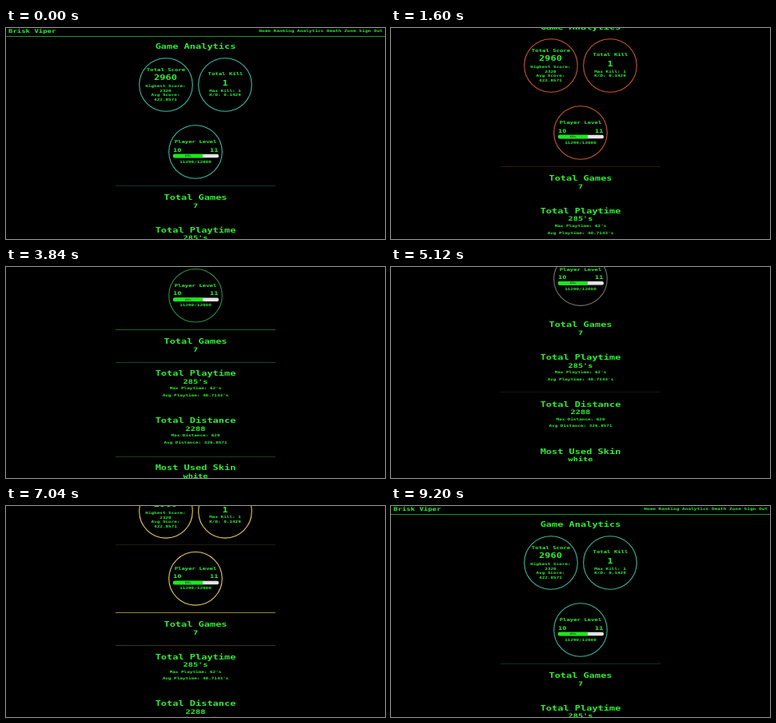
Animation of 474x264 px, one loop 9280 ms. Source, as an HTML page with a canvas:

```html
<!DOCTYPE html>
<html lang="en">
<head>
<meta charset="utf-8">
<title>Game Analytics</title>
<style>
  html, body { margin: 0; width: 100%; height: 100%; overflow: hidden; background: #000; }
  canvas { display: block; }
</style>
</head>
<body>
<canvas id="stage" width="474" height="264"></canvas>
<script>
const ctx = document.getElementById('stage').getContext('2d');
const W = 474, H = 264, MID = 237;
const LOOP = 9280, STEP = 80;
const GREEN = '#30f034';
const WIDEN = 1.38; // the typeface is wider than a regular monospace

// [time, value]
const SCROLL = [
  [0, 0], [1024, 0], [2480, 60.65], [3840, 119.25], [4440, 145],
  [4990, 145], [5840, 111.55], [7040, 64.15], [8650, 0], [LOOP, 0]
];
const BORDER = [
  [0, [62, 186, 164]], [1150, [180, 26, 24]], [2480, [232, 212, 92]],
  [3840, [46, 142, 74]], [4640, [62, 186, 164]]
];
const RULES = [112.4, 197.2, 238.35, 296.65, 356.38];

const lerp = (a, b, k) => Array.isArray(a) ? a.map((v, i) => lerp(v, b[i], k)) : a + (b - a) * k;

function at(keys, t) {
  const i = Math.max(1, keys.findIndex(key => key[0] >= t));
  const [t0, a] = keys[i - 1], [t1, b] = keys[i];
  return lerp(a, b, (t - t0) / (t1 - t0));
}

// advance = width of one character
function text(str, x, y, advance, align = 'center', color = GREEN) {
  const size = advance / 0.602 / WIDEN;
  ctx.save();
  ctx.translate(x, y + size * 0.365);
  ctx.scale(WIDEN, 1);
  ctx.font = `bold ${size}px "DejaVu Sans Mono", monospace`;
  ctx.textAlign = align;
  ctx.fillStyle = color;
  ctx.fillText(str, 0, 0);
  ctx.restore();
}

function ring(x, y, color) {
  ctx.beginPath();
  ctx.arc(x, y, 33.3, 0, Math.PI * 2);
  ctx.lineWidth = 1.1;
  ctx.strokeStyle = color;
  ctx.stroke();
}

// Hairlines fade in and out as they cross the pixel rows
function rule(y, color) {
  const distance = Math.abs(y - Math.round(y));
  ctx.globalAlpha = Math.max(0, 1 - distance / 0.3) * 0.8;
  ctx.fillStyle = color;
  ctx.fillRect(137, Math.floor(y + 0.15), 200, 1);
  ctx.globalAlpha = 1;
}

function bar(x, y, w, h, share) {
  ctx.save();
  ctx.beginPath();
  ctx.roundRect(x, y, w, h, h / 2);
  ctx.clip();
  ctx.fillStyle = '#e4e4e4';
  ctx.fillRect(x, y, w, h);
  ctx.fillStyle = '#10f010';
  ctx.fillRect(x, y, w * share, h);
  ctx.restore();
  text('65%', x + w * share / 2, y + h / 2, 2.6, 'center', '#0a4a0a');
}

function section(y, title, value, ...details) {
  text(title, MID, y, 7.2);
  text(value, MID, y + 10.2, 6.2);
  details.forEach((line, i) => text(line, MID, y + 18.6 + i * 8.9, 3.6));
}

function draw(t) {
  const scroll = at(SCROLL, t);
  const color = `rgb(${at(BORDER, t % (LOOP / 2)).map(Math.round)})`;
  ctx.fillStyle = '#000';
  ctx.fillRect(0, 0, W, H);
  RULES.forEach(y => rule(y - scroll, color));

  ctx.save();
  ctx.translate(0, -scroll);
  text('Brisk Viper', 3, 3.5, 5.4, 'left');
  text('Home Ranking Analytics Death Zone Sign Out', 471, 3.5, 3.69, 'right');
  ctx.fillStyle = '#2c8c3a';
  ctx.fillRect(0, 10, W, 1);
  text('Game Analytics', MID, 23, 7.2);

  ring(200, 71, color);
  text('Total Score', 200, 52, 4.4);
  text('2960', 199.5, 62, 7.2);
  ['Highest Score:', '2320', 'Avg Score:', '422.8571']
    .forEach((line, i) => text(line, 199.5, 72.8 + i * 5.5, 3.6));

  ring(274, 71, color);
  text('Total Kill', 274.5, 57.5, 4.4);
  text('1', 274, 68.5, 7.2);
  text('Max Kill: 1', 274, 78, 3.6);
  text('K/D: 0.1429', 274, 83.5, 3.6);

  ring(MID, 155, color);
  text('Player Level', MID, 142.5, 4.4);
  text('10', 209, 152.3, 5.2, 'left');
  text('11', 265.5, 152.3, 5.2, 'right');
  bar(209, 157.6, 57, 5, 0.65);
  text('11290/12000', MID, 167, 3.6);

  section(212, 'Total Games', '7');
  section(252.5, 'Total Playtime', "285's", "Max Playtime: 62's", "Avg Playtime: 40.7143's");
  section(311.3, 'Total Distance', '2288', 'Max Distance: 620', 'Avg Distance: 326.8571');
  section(370.3, 'Most Used Skin', 'white');
  ctx.restore();
}

const start = performance.now();
function frame() {
  const elapsed = (performance.now() - start) % LOOP;
  draw(Math.floor(elapsed / STEP) * STEP);
  requestAnimationFrame(frame);
}
frame();
</script>
</body>
</html>
```
